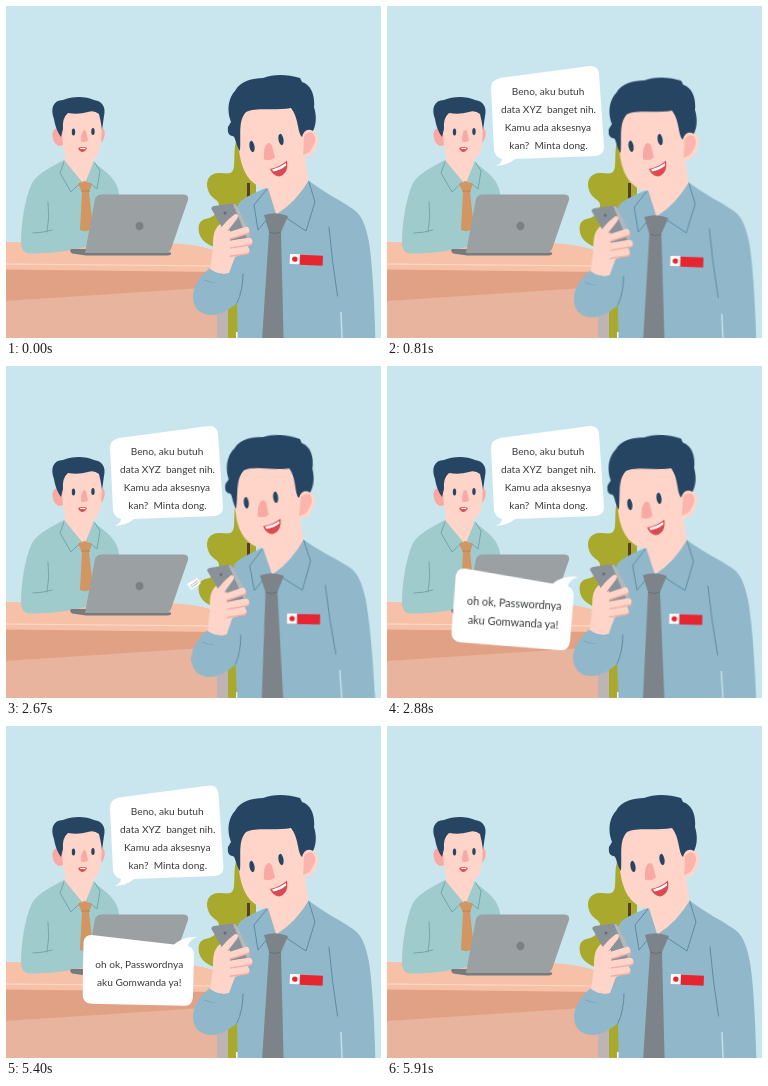
Animation, 375 px wide and 332 px high, one loop 6.3 s. Source, as an HTML page:

```html
<!DOCTYPE html>
<html lang="id">
<head>
<meta charset="utf-8">
<title>Office chat</title>
<style>
  html, body { margin: 0; width: 100%; height: 100%; overflow: hidden; background: #c9e6ee; }
  svg { display: block; width: 100%; height: 100%; }
  text { font: 10.1px Lato, sans-serif; fill: #383a3d; text-anchor: middle; white-space: pre; }

  .skin { fill: #fed5c8; }
  .pink { fill: #f9a9a3; }
  .navy { fill: #264563; }
  .white { fill: #fff; }
  .red { fill: #e5252f; }
  .mouth { fill: #dc4a50; }
  .shirt { fill: #90b8ca; }
  .shirt2 { fill: #a0cbcc; }
  .leaf { fill: #a8a92d; }
  .line { fill: none; stroke: #5c8ca5; stroke-linecap: round; stroke-linejoin: round; }
  .line2 { fill: none; stroke: #6da3a8; stroke-width: .9; stroke-linecap: round; stroke-linejoin: round; }

  .body, .head, .face, .bubble { animation: 6.3s linear infinite; }
  .body { transform-origin: 270px 345px; animation-name: body; }
  .head { transform-origin: 266px 100px; animation-name: head; }
  .face { animation-name: face; }
  .first { transform-origin: 109px 160px; animation-name: first; }
  .second { transform-origin: 191px 211px; animation-name: second; }

  /* dip and lean at 0.27-1.11 s, back at 2.67-3.12 s */
  @keyframes body {
    0%, 4.29% { transform: translate(0, 0) rotate(0deg); animation-timing-function: ease-in-out; }
    12.86% { transform: translate(0, 2px) rotate(-.3deg); animation-timing-function: ease-in-out; }
    17.62%, 42.38% { transform: translate(0, 0) rotate(-1.7deg); animation-timing-function: ease-in-out; }
    49.52%, 100% { transform: translate(0, 0) rotate(0deg); }
  }
  @keyframes head {
    0%, 4.29% { transform: translate(0, 0) rotate(0deg); animation-timing-function: ease-in-out; }
    12.86% { transform: translate(0, 2.5px) rotate(.5deg); animation-timing-function: ease-in-out; }
    17.62%, 42.38% { transform: translate(-1.5px, -.5px) rotate(3deg); animation-timing-function: ease-in-out; }
    49.52%, 100% { transform: translate(0, 0) rotate(0deg); }
  }
  @keyframes face {
    0%, 4.29% { transform: translate(0, 0); animation-timing-function: ease-in-out; }
    12.86% { transform: translate(-1.6px, -2.5px); animation-timing-function: ease-in-out; }
    17.62%, 42.38% { transform: translate(-2.2px, -2px); animation-timing-function: ease-in-out; }
    49.52%, 100% { transform: translate(0, 0); }
  }
  /* bubbles swing in with overshoot, shrink out with anticipation */
  @keyframes first {
    0%, 4.15% { transform: rotate(40deg) scale(0); animation-timing-function: cubic-bezier(.34, 1.56, .64, 1); }
    11.6% { transform: rotate(0deg) scale(1); }
    85.24% { transform: rotate(0deg) scale(1); animation-timing-function: cubic-bezier(.36, 0, .66, -.56); }
    93.75% { transform: rotate(0deg) scale(0); }
    100% { transform: rotate(40deg) scale(0); }
  }
  @keyframes second {
    0%, 42.22% { transform: rotate(-40deg) scale(0); animation-timing-function: cubic-bezier(.34, 1.56, .64, 1); }
    49.52% { transform: rotate(0deg) scale(1); }
    85.24% { transform: rotate(0deg) scale(1); animation-timing-function: cubic-bezier(.36, 0, .66, -.56); }
    93.75% { transform: rotate(0deg) scale(0); }
    100% { transform: rotate(-40deg) scale(0); }
  }
</style>
</head>
<body>
<svg viewBox="0 0 375 332" preserveAspectRatio="none">
  <rect width="375" height="332" fill="#c9e6ee"/>

  <!-- plant -->
  <path class="leaf" d="M233 130C227 138 229 150 228 160C227 170 221 167 213 167C203 167 199 175 202 184C205 194 214 193 213 200C212 208 206 212 199 213C191 215 191 226 196 233C202 241 212 240 217 248L222 332H231L250 230V130Z"/>
  <path d="M241 177H244V205H241Z" fill="#54401f"/>
  <path class="white" d="M230 326H234V332H230Z"/>

  <!-- desk -->
  <path d="M211 262H222V332H211Z" fill="#bdb4b5"/>
  <path d="M0 236L160 237Q196 238 214 247V267H0Z" fill="#f7c1a7"/>
  <path d="M0 258L214 260" stroke="#fbdccb" stroke-width="1.2"/>
  <path d="M0 263.500L214 266V284L0 297Z" fill="#e0a185"/>
  <path d="M0 295L211 281V332H0Z" fill="#e9b49d"/>

  <!-- colleague -->
  <path class="shirt2" d="M58 154C45 161 32 167 26 177C18 194 15 221 15 237Q15 247 24 247.500C43 247.500 65 245 84 240L113 215V188C112 176 104 168 87 156Z"/>
  <path class="skin" d="M60 148L57 160Q66 172 78 177Q86 169 87 158L86 146Z"/>
  <path class="shirt2" d="M58 154L54 166L65 186L77 177ZM88 155L94 164L91 182L79 177Z"/>
  <path class="line2" d="M58 156L54 167L65 186L74 177M89 157L94 165L91 183L84 177M42 196Q44 211 41 226M27 227Q36 227 46 224"/>
  <path d="M72 178L78 175L86 178L83 186L87 222Q81 227 74 224L76 186Z" fill="#d19662"/>
  <path d="M75 185L84 185" stroke="#b77c4c" stroke-width=".8"/>
  <path class="pink" d="M56 124C49 119 45 125 47 132C48 139 54 142 58 138ZM93 123C98 120 100 126 98 132Q96 138 92 137Z"/>
  <path class="skin" d="M55 104L57 142C59 152 67 159 76 159C86 158 94 149 95 138L97 104Z"/>
  <path class="navy" d="M55 131C52 127 49 120 48 113C44 103 47 94 57 94C66 90 80 90 88 94C97 95 100 102 98 110L96 124Q95 116 93 108Q88 104 82 106Q72 109 62 107Q56 112 57 123Z"/>
  <ellipse class="navy" cx="67.500" cy="126" rx="1.700" ry="3.600"/>
  <ellipse class="navy" cx="87" cy="125.500" rx="1.700" ry="3.600"/>
  <path class="pink" d="M78 124Q80.500 124 80.500 128L82 134Q81 137 75 135.500Q75 126 78 124Z"/>
  <path class="mouth" d="M72 142Q77 140 81 142Q79 146 76 146Q73 145 72 142Z"/>
  <path class="white" d="M74 142.200Q77 141.200 79.500 142.200L79 143.200Q76 142.700 74.500 143.200Z"/>

  <!-- laptop -->
  <path d="M65 243H82L165 246.500Q166 249.500 161 249.500L80 249.500L66 247.500Q63 245 65 243Z" fill="#777b80"/>
  <path d="M95 188.500H178Q183 189 182 194L165 243Q163 247 159 247H79L89 193Q90 189 95 188.500Z" fill="#9ba0a2"/>
  <ellipse cx="133.500" cy="220" rx="4" ry="4.300" fill="#7c8084"/>

  <!-- man with phone -->
  <g class="body">
    <path class="shirt" d="M262 181C250 187 239 190 233 197C228 210 228 235 222 262L204 262C195 269 187 280 187 291C187 303 196 310 207 309C216 308 224 303 231 297L232 352H370C369 320 368 270 363 236C359 215 354 208 347 203C334 194 317 186 302 174Z"/>
    <path class="line" d="M231 297Q237 284 237 268M199 274Q208 279 219 272M323 221Q326 256 331.500 290"/>
    <path d="M335 306L336.500 345" stroke="#c3dfe9" stroke-width="1.500"/>
    <path class="skin" d="M259 168L262 188Q264 201 270 209Q288 200 303 178L298 145Z"/>
    <path class="shirt" d="M262 182L248 199L252 224L270 208ZM303 174L309 196L300 225L271 208Q290 196 303 174Z"/>
    <path class="line" d="M261 183L248 199L252 224L263 211M303 176L309 196L300 225L279 211"/>
    <path d="M258 209Q270 205 282 210L275 226L278 350H255L263 226Z" fill="#7c848a"/>
    <path d="M263 226Q269 229 275 226" fill="none" stroke="#697178"/>
    <g transform="rotate(2 284 248)">
      <path class="white" d="M284 248H294V258H284Z"/>
      <circle class="red" cx="289" cy="253" r="2.700"/>
      <path class="red" d="M294 248.500H317V258.500H294Z"/>
    </g>
    <path class="skin" d="M214 218C207 224 207 232 207 242L204 263Q212 270 223 267L229 251Q241 248 243 238L236 214Z"/>
    <path d="M208 200L226 197.500Q230 197 232 201L243 225Q245 229 241 232L229 236Q224 237 222 232L206 204Q204 201 208 200Z" fill="#899298"/>
    <path d="M229 198L232 201L244 226Q245 230 241 232L227 198Z" fill="#b1b9bd"/>
    <circle cx="219" cy="207" r="1.500" fill="#646d73"/>
    <path class="skin" d="M209 234C212 223 221 214 229 208Q234 208 231 213L220 227L222 246L209 249Z"/>
    <g fill="none" stroke-linecap="round">
      <path d="M224 230L240 225M224 239L243 236M225 247L240 245" stroke="#f3ada2" stroke-width="7.500"/>
      <path d="M224 229L240 224M224 238L243 235M225 246L240 244" stroke="#fed5c8" stroke-width="6.500"/>
    </g>
    <path class="skin" d="M210 230L224 224V250H208Z"/>
    <path class="shirt" d="M204 263Q214 270 225 267L228 273Q208 279 199 274Z"/>
  </g>

  <g class="head">
    <path class="skin" d="M296 127C302 119 312 124 312 134C311 146 303 154 295 151Z"/>
    <path class="pink" d="M298 130C304 123 310 127 309 135Q306 147 297 149Z" opacity=".75"/>
    <path class="skin" d="M232 112L233 144C235 161 241 177 257 182C276 184 294 170 297 149L298 100Q262 88 232 112Z"/>
    <path class="navy" d="M234 145C229 138 230 130 226 130Q221 129 222 121L225 116C220 104 223 91 229 85C234 75 247 72 257 72C267 68 281 68 294 72L296 76C306 79 309 91 308 101C311 111 310 119 307 125Q299 121 296 131C291 126 293 112 285 102C267 105 250 101 240 106C232 115 235 127 234 145Z"/>
    <g class="face">
      <ellipse class="navy" cx="246" cy="140.500" rx="2.500" ry="5.700" transform="rotate(-10 246 140.500)"/>
      <ellipse class="navy" cx="275" cy="133.500" rx="2.500" ry="5.700" transform="rotate(-10 275 133.500)"/>
      <path class="pink" d="M262 137Q266 137 266.500 142L269 151Q266 155.500 258 153.500Q257 140 262 137Z"/>
      <path class="mouth" d="M264 163Q274 161 281 154.500Q283 168 273 170.500Q267 170 264 163Z"/>
      <path class="white" d="M266 163.500Q274 161.500 280 157L280 159.500Q275 164 267.500 165.500Z"/>
    </g>
  </g>

  <!-- speech -->
  <g class="bubble first">
    <path class="white" d="M113 72L203 60Q211 59.500 212 68L217 141Q217 149 209 150L128 153Q121 159 109 160Q115 157 115 153Q108 151 107 144L104 82Q104 74 113 72Z"/>
    <text x="161" y="89">Beno, aku butuh</text>
    <text x="161.500" y="107">data XYZ&#160; banget nih.</text>
    <text x="161" y="125">Kamu ada aksesnya</text>
    <text x="161.500" y="143">kan?&#160; Minta dong.</text>
  </g>
  <g class="bubble second">
    <path class="white" d="M86 209L168 218.500Q177 210 191 211Q183 214 182 220Q188 222 188 229L187 271Q186 280 178 279.500L86 277.500Q77 277 77 268L78 216Q79 209 86 209Z"/>
    <text x="133.500" y="242">oh ok, Passwordnya</text>
    <text x="133.500" y="260">aku Gomwanda ya!</text>
  </g>
</svg>
</body>
</html>
```
